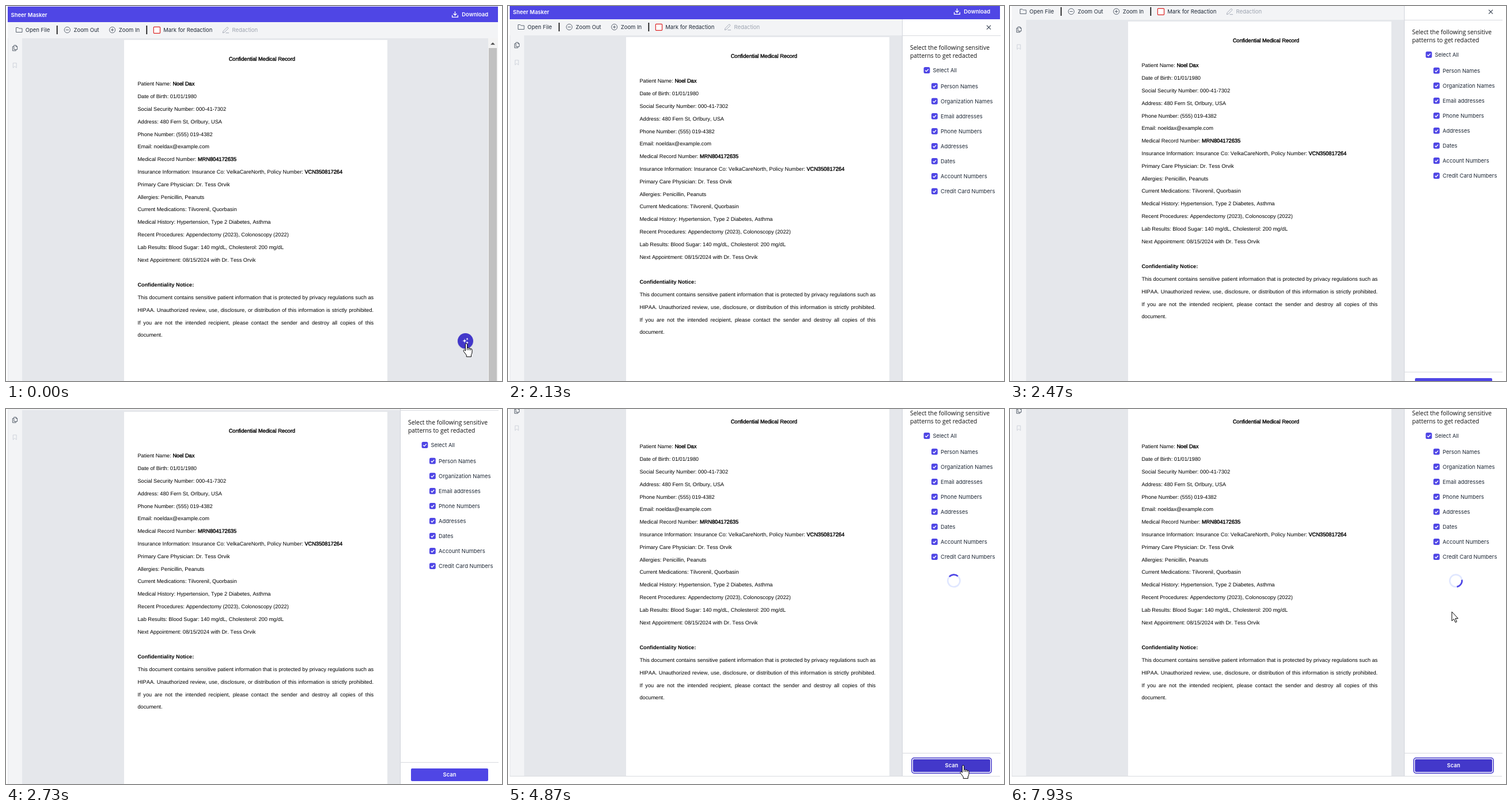
An HTML page that plays this animation: 861x651 px, repeating every 8000 ms.

```html
<!DOCTYPE html>
<html lang="en">
<head>
<meta charset="utf-8">
<title>Document redaction</title>
<style>
html, body { margin: 0; width: 100%; height: 100%; overflow: hidden; background: #fff; }
#stage { position: relative; width: 861px; height: 651px; overflow: hidden; }
#app { position: absolute; left: 0; top: 0; width: 861px; height: 721px; }
#app div, #app svg { position: absolute; }
svg { overflow: visible; }
.ui { font: 9.45px/14px Inter, sans-serif; color: #1f2937; white-space: nowrap; }
.strong { font-weight: 600; color: #fff; }
.off { color: #9ca3af; }
.head { font: 10.35px/14px "Open Sans", sans-serif; color: #111; white-space: nowrap; }
.bar { left: 3px; top: 1px; width: 851px; height: 27px; background: #4f46e5; }
.tools { left: 3px; top: 28px; width: 851px; height: 28px; background: #f3f4f6; }
.side { left: 3px; top: 55px; width: 25px; height: 652px; background: #f3f4f6; border-left: 1px solid #e5e7eb; box-sizing: border-box; }
.view { left: 28px; top: 55px; width: 826px; height: 652px; background: #e5e7eb; }
.edge { left: 3px; top: 707px; width: 851px; height: 1px; background: #d9dbe0; }
.page { left: 204.5px; top: 59px; width: 457.5px; height: 648px; background: #fff; }
.line { left: 228.4px; width: 409.8px; height: 21.8px; white-space: nowrap; font: 9.22px/21.8px "Liberation Sans", Arial, sans-serif; font-kerning: none; text-rendering: geometricPrecision; color: #000; }
.line b { font-weight: 400; -webkit-text-stroke: .4px #000; }
.title { left: 239.4px; text-align: center; }
.full { text-align: justify; text-align-last: justify; white-space: normal; }
.bold { font-weight: 700; }
.track { left: 837px; top: 56px; width: 17px; height: 651px; background: #f3f3f3; }
.thumb { left: 838px; top: 73px; width: 14px; height: 634px; background: #c1c1c1; }
#panel { left: 683.5px; top: 28px; width: 171.5px; height: 679px; background: #fff; border-left: 1px solid #d1d5db; box-sizing: border-box; }
.rule { left: 684px; width: 171px; height: 1px; background: #d8dadf; }
#scan { left: 703px; top: 678px; width: 134px; height: 22px; border-radius: 2px; background: #4f46e5; text-align: center; line-height: 21.5px; }
#scan.dark { background: #4338ca; }
#scan.focus { box-shadow: 0 0 0 1.4px #fff, 0 0 0 2.9px #4338ca; }
#fab { left: 784px; top: 568px; width: 27px; height: 27px; border-radius: 50%; background: #4338ca; box-shadow: 0 1px 2px #0002; }
#cursor { position: absolute; left: 0; top: 0; }
</style>
</head>
<body>
<div id="stage">
  <div id="app">
    <div class="view"></div>
    <div class="side"></div>
    <div class="page"></div>
    <div id="doc"></div>
    <div class="track"></div>
    <div class="thumb"></div>
    <div class="edge"></div>
    <div class="tools"></div>
    <div class="bar"></div>
    <div id="labels"></div>
    <svg width="861" height="721" fill="none" stroke="#4b5563" stroke-width=".9">
      <path d="M17.5 45.5V37.5H21.3L22.8 39H28V45.5Z"/>
      <path d="M88.7 34V49M244.3 34V49" stroke="#111" stroke-width="1.7"/>
      <circle cx="106.3" cy="41.5" r="5.1"/>
      <circle cx="184.6" cy="41.5" r="5.1"/>
      <path d="M103.6 41.5H109M181.9 41.5H187.3M184.6 38.8V44.2"/>
      <rect x="256.3" y="36.3" width="11.2" height="11" rx="1" fill="#fff" stroke="#dc2626" stroke-width="1.2"/>
      <path d="M376.3 46.6L377 43.7 383.2 37.3Q384.3 36.5 385.3 37.5 386.2 38.6 385.3 39.6L379 45.9ZM381.5 46.7H387" stroke="#9ca3af"/>
      <path d="M779.5 9.5V16M776.6 13.3L779.5 16.2 782.4 13.3M774.6 15.8V19.3H784.4V15.8" stroke="#fff" stroke-width="1.3"/>
      <path d="M13.8 68.2H17.4L19.6 70.4V75.6H13.8ZM17.2 68.2V70.6H19.6M13.8 70.3H11.4V77.7H17.2V75.6"/>
      <path d="M12.3 99H18.2V107.3L15.2 104.8 12.3 107.3Z" stroke="#cbd0d8"/>
      <path d="M841 67.3L845 63.3 849 67.3Z" fill="#505050" stroke="none"/>
    </svg>
    <div id="fab"><svg width="27" height="27" fill="#fff"><path id="stars"/></svg></div>
    <div id="side">
      <div id="panel"></div>
      <div class="rule" style="top:56px"></div>
      <div class="rule" style="top:666.5px"></div>
      <svg width="861" height="721" fill="none">
        <path d="M831 38.7L838 45.7M838 38.7L831 45.7" stroke="#374151" stroke-width="1.1"/>
        <g id="boxes"></g>
        <g id="spinner" stroke-width="2.6">
          <circle r="10.6" stroke="#e0e7ff"/>
          <circle r="10.6" stroke="#4f46e5" pathLength="4" stroke-dasharray="1 3"/>
        </g>
      </svg>
      <div id="options"></div>
      <div id="scan" class="ui strong">Scan</div>
    </div>
  </div>
  <svg id="cursor" width="1" height="1" fill="#fff" stroke="#000" stroke-linejoin="round">
    <path id="arrow" d="M.5 .5V16.3L4.1 13 6.6 18.9 9 17.9 6.6 12.1H11.3Z"/>
    <g id="hand" transform="translate(-5.5 0)">
      <path d="M4 2.1A1.6 1.6 0 0 1 7.2 2.1V8.2Q8.7 6.8 10 8.7 11.5 7.6 12.7 9.5 15.4 8.8 15.6 11.6V15.5Q15.5 18 14 20V23.4H5.8V20.6L1.1 14.3C-.2 12.3 1.6 10.6 3.1 12.1L4 13.2Z"/>
      <path d="M7.2 8V12M10 8.7V12M12.7 9.5V12.3" fill="none"/>
    </g>
  </svg>
</div>
<script>
const $ = id => document.getElementById(id);

const lines = [
  "Patient Name: <b>Noel Dax</b>",
  "Date of Birth: 01/01/1980",
  "Social Security Number: 000-41-7302",
  "Address: 480 Fern St, Orlbury, USA",
  "Phone Number: (555) 019-4382",
  "Email: noeldax@example.com",
  "Medical Record Number: <b>MRN804172635</b>",
  "Insurance Information: Insurance Co: VelkaCareNorth, Policy Number: <b>VCN350817264</b>",
  "Primary Care Physician: Dr. Tess Orvik",
  "Allergies: Penicillin, Peanuts",
  "Current Medications: Tilvorenil, Quorbasin",
  "Medical History: Hypertension, Type 2 Diabetes, Asthma",
  "Recent Procedures: Appendectomy (2023), Colonoscopy (2022)",
  "Lab Results: Blood Sugar: 140 mg/dL, Cholesterol: 200 mg/dL",
  "Next Appointment: 08/15/2024 with Dr. Tess Orvik"
];
const notice = [
  "This document contains sensitive patient information that is protected by privacy regulations such as",
  "HIPAA. Unauthorized review, use, disclosure, or distribution of this information is strictly prohibited.",
  "If you are not the intended recipient, please contact the sender and destroy all copies of this"
];
const row = (k, text, cls = "") =>
  `<div class="line ${cls}" style="top:${81.8 + 21.8 * k}px">${text}</div>`;
$("doc").innerHTML = row(0, "<b>Confidential Medical Record</b>", "title") +
  lines.map((s, i) => row(i + 2, s)).join("") +
  row(18, "Confidentiality Notice:", "bold") +
  notice.map((s, i) => row(i + 19, s, "full")).join("") +
  row(22, "document.");

// Text placed by its left edge and vertical middle
const label = (x, y, text, cls = "ui") =>
  `<div class="${cls}" style="left:${x}px;top:${y - 7}px">${text}</div>`;
$("labels").innerHTML =
  label(8.5, 15.5, "Sheer Masker", "ui strong") +
  label(791.3, 14.8, "Download", "ui strong") +
  label(33.8, 41.7, "Open File") +
  label(117.6, 41.7, "Zoom Out") +
  label(195.8, 41.7, "Zoom In") +
  label(273.3, 41.7, "Mark for Redaction") +
  label(392.6, 41.7, "Redaction", "ui off");

const options = ["Person Names", "Organization Names", "Email addresses", "Phone Numbers",
  "Addresses", "Dates", "Account Numbers", "Credit Card Numbers"];
const optionY = i => 144.2 + 26.05 * i;
const box = (x, y) => `<g transform="translate(${x} ${y})">
  <rect x="-5.4" y="-5.4" width="10.8" height="10.8" rx="2.5" fill="#4f46e5"/>
  <path d="M-2.7 .2L-.8 2.1 2.8 -1.8" stroke="#fff" stroke-width="1.4"/></g>`;
$("boxes").innerHTML = box(727, 116.5) + options.map((s, i) => box(740.4, optionY(i))).join("");
$("options").innerHTML =
  label(698, 76.8, "Select the following sensitive", "head") +
  label(698, 90.7, "patterns to get redacted", "head") +
  label(737.5, 117.1, "Select All") +
  options.map((s, i) => label(751, optionY(i) + .8, s)).join("");

const star = (x, y, r) => `M${x} ${y - r}Q${x} ${y} ${x + r} ${y}Q${x} ${y} ${x} ${y + r}` +
  `Q${x} ${y} ${x - r} ${y}Q${x} ${y} ${x} ${y - r}Z`;
const fat = (x, y, r) => star(x, y, r) + `M${x - r / 2} ${y}L${x} ${y - r / 2}L${x + r / 2} ${y}L${x} ${y + r / 2}Z`;
$("stars").setAttribute("d", fat(12, 13.2, 4.3) + fat(16.6, 10.1, 2.8) + fat(16.6, 16.4, 2.8));

// Pointer route: step, x, y
const route = [
  [3, 799, 585.5], [6, 797, 584], [16, 797, 584], [23, 868, 512],
  [53, 868, 560], [54, 853, 567], [65, 790, 618], [73, 790, 618],
  [78, 788, 505], [82, 779, 374], [84, 766.5, 351.5]
];
function pointer(n) {
  if (n <= route[0][0]) return route[0].slice(1);
  const i = route.findIndex(p => p[0] >= n);
  if (i < 0) return route[route.length - 1].slice(1);
  const [a, x0, y0] = route[i - 1], [b, x1, y1] = route[i];
  const k = (n - a) / (b - a);
  return [x0 + (x1 - x0) * k, y0 + (y1 - y0) * k];
}

const LOOP = 8000, STEP = 1000 / 15, SPIN = 1300;
const clamp = v => Math.max(0, Math.min(1, v));
const show = (id, on) => { $(id).style.display = on ? "" : "none"; };

function draw(t) {
  const n = Math.floor((t + 4) / STEP);
  const [x, y] = pointer(n);
  const onScan = n > 53 && x > 703 && x < 837 && y > 608 && y < 630;
  const hand = n < 10 || onScan;

  $("app").style.transform = `translateY(${-Math.round(70 * clamp((n - 31) / 13))}px)`;
  show("side", n >= 9);
  show("fab", n < 9);

  $("scan").classList.toggle("dark", onScan || n >= 70);
  $("scan").classList.toggle("focus", n >= 70);
  show("spinner", n >= 72);
  const turn = 175 + (n - 90) * STEP / SPIN * 360;
  $("spinner").setAttribute("transform", `translate(774 368.2) rotate(${turn})`);

  show("hand", hand);
  show("arrow", !hand);
  $("cursor").style.transform = `translate(${x}px, ${y}px)`;
}

const start = performance.now();
function tick() {
  draw((performance.now() - start) % LOOP);
  requestAnimationFrame(tick);
}
tick();
</script>
</body>
</html>
```
